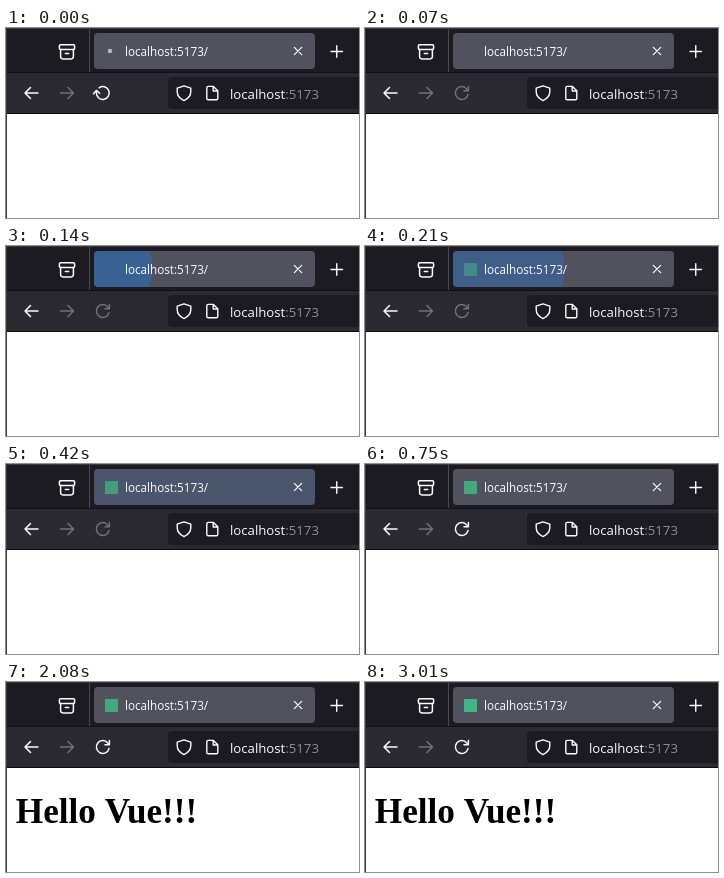
Recreate the animation shown at these times as an HTML page with a canvas. Size 353 by 190 pixels, loop 3.08 s.

```html
<!DOCTYPE html>
<html lang="en">
<head>
<meta charset="utf-8">
<title>Browser reload</title>
<style>
html, body { margin: 0; width: 100%; height: 100%; overflow: hidden; background: #fff; }
canvas { display: block; width: 353px; height: 190px; }
</style>
</head>
<body>
<canvas id="stage" width="353" height="190"></canvas>
<script>
const ctx = document.getElementById('stage').getContext('2d');
const LOOP = 3080;
const WHITE = '#fbfbfe', DIM = '#73727b', BAR = '#1c1b22', TOOL = '#2b2a33', TAB = '#52515e';
const UI = '"Open Sans", "Noto Sans", sans-serif';

function rect(x, y, w, h, color) {
  ctx.fillStyle = color;
  ctx.fillRect(x, y, w, h);
}

function roundRect(x, y, w, h, r) {
  ctx.beginPath();
  ctx.roundRect(x, y, w, h, r);
}

function disc(x, y, r, color) {
  ctx.fillStyle = color;
  ctx.beginPath();
  ctx.arc(x, y, r, 0, Math.PI * 2);
  ctx.fill();
}

function icon(d, color = WHITE, width = 1.5) {
  ctx.strokeStyle = color;
  ctx.lineWidth = width;
  ctx.lineCap = ctx.lineJoin = 'round';
  ctx.stroke(new Path2D(d));
}

function text(str, x, y, font, color) {
  ctx.font = font;
  ctx.fillStyle = color;
  ctx.fillText(str, x, y);
  return x + ctx.measureText(str).width;
}

// ease-out: cubic-bezier(0, 0, .58, 1)
function easeOut(x) {
  let lo = 0, hi = 1;
  for (let i = 0; i < 20; i++) {
    const s = (lo + hi) / 2;
    if (3 * 0.58 * s * s * (1 - s) + s ** 3 < x) lo = s; else hi = s;
  }
  return lo * lo * (3 - 2 * lo);
}

function drawBurst(t) {
  if (t < 140 || t >= 480) return;
  const step = Math.floor((t - 140) / 70);
  const p = easeOut(0.095 + step * 0.128);
  ctx.save();
  roundRect(88, 5, 221, 36, 4);
  ctx.clip();
  ctx.globalAlpha = 0.4 * (1 - p);
  disc(104, 23, 280 * p, '#0a84ff');
  ctx.restore();
}

function drawFavicon(t) {
  if (t < 70) disc(104, 23, 2.3, '#b5b5be');
  if (t < 210) return;
  ctx.globalAlpha = t < 280 ? 0.5 : t < 350 ? 0.58 : t < 480 ? 0.72 : t < 3010 ? 0.85 : 1;
  rect(99, 17, 13, 13, '#41b883');
  ctx.globalAlpha = 1;
}

function drawReload(t) {
  const color = t >= 70 && t < 750 ? DIM : WHITE;
  ctx.save();
  ctx.translate(96.8, 65);
  if (t < 70) ctx.rotate(-140 * Math.PI / 180);
  icon('M6.2 1.6A6.4 6.4 0 1 1 4.9 -4.1L6 -2.7', color);
  icon('M6.6 -6.6V-2.2H2.2', color);
  ctx.restore();
}

function drawTabs(t) {
  rect(0, 0, 353, 45, BAR);
  rect(83, 1, 1, 43, '#4a4952');
  icon('M54.5 16.8H67.5Q68.6 16.8 68.6 18V20.2Q68.6 21.4 67.5 21.4H54.5Q53.4 21.4 53.4 20.2V18Q53.4 16.8 54.5 16.8Z');
  icon('M54.6 21.6V28.6Q54.6 30.9 56.9 30.9H65.1Q67.4 30.9 67.4 28.6V21.6M59.3 25.4H62.7');
  roundRect(88, 5, 221, 36, 4);
  ctx.fillStyle = TAB;
  ctx.fill();
  drawBurst(t);
  drawFavicon(t);
  text('localhost:5173/', 119, 28, '11.7px ' + UI, WHITE);
  icon('M288.3 19.3L295.7 26.7M295.7 19.3L288.3 26.7', WHITE, 1.2);
  icon('M325 23.5H336.5M330.75 17.75V29.25', WHITE, 1.4);
}

function drawToolbar(t) {
  rect(0, 44, 353, 1, '#111015');
  rect(0, 45, 353, 40, TOOL);
  rect(0, 85, 353, 1, '#0c0c0d');
  icon('M19 65H32M24.5 59.5L19 65L24.5 70.5');
  icon('M54.5 65H67.5M62 59.5L67.5 65L62 70.5', DIM);
  drawReload(t);
  roundRect(162, 49, 200, 32, 4);
  ctx.fillStyle = BAR;
  ctx.fill();
  icon('M178 57.8L184.8 60.2V63.5Q184.8 69.6 178 72.6Q171.2 69.6 171.2 63.5V60.2Z', WHITE, 1.4);
  icon('M202.2 58.4H207.4L211.8 62.8V70.4Q211.8 71.8 210.4 71.8H202.2Q200.8 71.8 200.8 70.4V59.8Q200.8 58.4 202.2 58.4ZM207.2 58.6V63H211.6', WHITE, 1.4);
  const font = '13.2px ' + UI;
  const x = text('localhost', 224, 71, font, WHITE);
  text(':5173', x, 71, font, '#8f8e96');
}

function draw(t) {
  rect(0, 0, 353, 190, '#fff');
  drawTabs(t);
  drawToolbar(t);
  rect(0, 0, 353, 1, '#3a3944');
  rect(0, 0, 1, 190, '#3a3944');
  if (t >= 2080) {
    text('Hello Vue!!!', 9.8, 141, 'bold 35.2px "Liberation Serif", "Times New Roman", serif', '#000');
  }
}

const start = performance.now();
function frame() {
  draw((performance.now() - start) % LOOP);
  requestAnimationFrame(frame);
}
frame();
</script>
</body>
</html>
```
